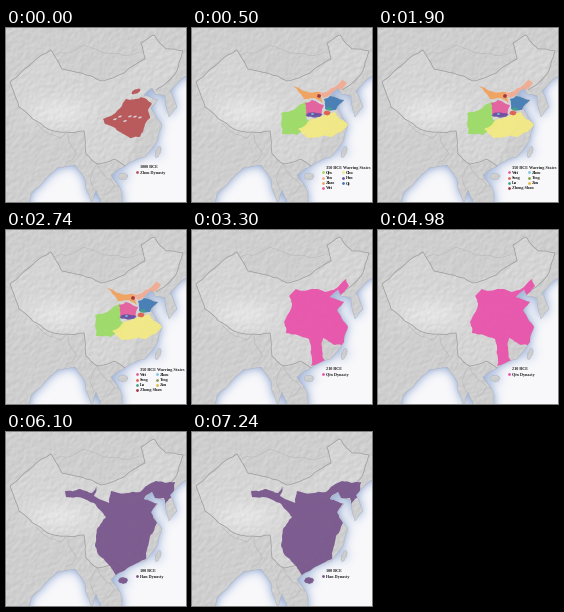
A matplotlib script that plays this animation: 180 px wide and 174 px high, repeating every 8 s.

```python
import numpy as np
import matplotlib.pyplot as plt
from matplotlib.animation import FuncAnimation
from matplotlib.patches import PathPatch
from matplotlib.path import Path

W, H, DPI = 180, 174, 100
INTERVAL, FRAMES = 100, 80
STARTS = [0, 500, 1900, 3300, 6100]

fig = plt.figure(figsize=(W / DPI, H / DPI), dpi=DPI)
ax = fig.add_axes([0, 0, 1, 1])
ax.set_xlim(0, W)
ax.set_ylim(H, 0)
ax.axis("off")


def rough(points, amount=0.1, closed=True, depth=3):
    """Join key points by a ragged line made by midpoint displacement."""
    pts = np.array(points, float)
    rng = np.random.default_rng(4)
    if closed:
        pts = np.vstack([pts, pts[:1]])
    for _ in range(depth):
        step = np.diff(pts, axis=0)
        normal = np.c_[-step[:, 1], step[:, 0]]
        mid = pts[:-1] + step / 2 + normal * rng.uniform(-amount, amount, (len(step), 1))
        out = np.empty((len(pts) * 2 - 1, 2))
        out[::2], out[1::2] = pts, mid
        pts = out
    return Path(pts, closed=closed)


def blob(x, y, rx, ry, tilt=0):
    """A ragged ellipse."""
    a = np.linspace(0, 2 * np.pi, 8, endpoint=False)
    u, v, t = rx * np.cos(a), ry * np.sin(a), np.radians(tilt)
    return rough(np.c_[x + u * np.cos(t) - v * np.sin(t),
                       y + u * np.sin(t) + v * np.cos(t)], depth=2)


def blur(a, sigma):
    r = int(3 * sigma) + 1
    k = np.exp(-np.arange(-r, r + 1) ** 2 / (2 * sigma ** 2))
    k /= k.sum()
    for axis in (0, 1):
        pad = [(r, r) if i == axis else (0, 0) for i in (0, 1)]
        a = np.apply_along_axis(np.convolve, axis, np.pad(a, pad, mode="edge"), k, "valid")
    return a


def mix(a, b, t):
    return np.array(a) + (np.array(b) - np.array(a)) * t[..., None]


# Coast from the north-east round to the south-west
COAST = [
    (240, 15), (178, 49), (164, 63), (171, 79), (163, 89), (159, 68), (149, 66),
    (146, 60), (138, 67), (152, 72), (145, 80), (156, 97), (152, 112), (139, 129),
    (119, 138), (105, 147), (116, 165), (115, 200), (100, 200), (90, 162),
    (86, 176), (79, 151), (69, 137), (51, 140), (25, 166), (20, 200)]
MAINLAND = rough([(-60, 200), (-60, -60), (240, -60)] + COAST, 0.06)
TAIWAN = blob(152, 124, 6, 2.5, 110)
HAINAN = blob(117, 148.5, 5, 3.5)
LAND = Path.make_compound_path(MAINLAND, TAIWAN, HAINAN)

BORDER = rough([
    (150, 62), (169, 46), (177, 23), (160, 21), (148, 7), (135, 15), (139, 31),
    (118, 45), (95, 53), (56, 41), (45, 22), (25, 36), (4, 54), (13, 79), (42, 101),
    (78, 103), (80, 126), (92, 136), (108, 131), (119, 138)], 0.06, closed=False)
NEIGHBOURS = [
    [(47, 27), (78, 17), (101, 25), (133, 24)],
    [(30, 95), (54, 110), (62, 104), (71, 126), (60, 135)],
    [(92, 136), (84, 151), (88, 162)],
    [(92, 136), (109, 157), (101, 167)],
]

# Relief and sea shading
yy, xx = np.mgrid[0.5:H, 0.5:W]
cells = np.c_[xx.ravel(), yy.ravel()]
on_land = np.any([p.contains_points(cells) for p in (MAINLAND, TAIWAN, HAINAN)], axis=0)
near = np.clip(blur(on_land.reshape(H, W).astype(float), 5) * 1.5, 0, 1)
sea = mix([.975, .975, .985], [.66, .73, .86], near)

rng = np.random.default_rng(12)
relief = blur(rng.normal(size=(H, W)), 1.2)
slope = np.gradient(relief, axis=0) + np.gradient(relief, axis=1)
slope = np.clip(slope / slope.std(), -2, 2)
plateau = np.exp(-((xx - 53) / 31) ** 2 - ((yy - 84) / 15) ** 2)
inside = BORDER.contains_points(cells).reshape(H, W)
gray = .81 + .025 * inside + .06 * plateau + .012 * slope
land = np.repeat(np.clip(gray, 0, 1)[..., None], 3, axis=2)

extent = (0, W, H, 0)
ax.imshow(sea, extent=extent, aspect="auto", interpolation="bilinear")
ground = ax.imshow(land, extent=extent, aspect="auto", interpolation="bilinear")
ground.set_clip_path(LAND, ax.transData)


def outline(path, color, width):
    ax.add_patch(PathPatch(path, fc="none", ec=color, lw=width, zorder=2))


outline(LAND, "#a9b0bc", .3)
outline(BORDER, "#999999", .5)
for points in NEIGHBOURS:
    outline(rough(points, closed=False), "#b4b4b4", .35)


def region(color, shape, alpha=.92):
    path = shape if isinstance(shape, Path) else rough(shape)
    patch = ax.add_patch(PathPatch(path, fc=color, ec="none", alpha=alpha, zorder=3))
    patch.set_clip_path(LAND, ax.transData)
    return patch


def label(x, y, text):
    return ax.text(x, y, text, family="Liberation Serif", weight="bold",
                   fontsize=4.3 * 72 / DPI, color="#222222",
                   va="center_baseline", zorder=6)


def legend(title, *columns):
    items = [label(134, 139, title)]
    for x, entries in zip((134, 154), columns):
        for row, (name, color) in enumerate(entries.items()):
            y = 144.3 + 5.2 * row
            items += ax.plot(x - 3.3, y, "o", ms=2, mew=0, color=color, zorder=6)
            items.append(label(x, y, name))
    return items


RED, PINK, PURPLE = "#b75052", "#e94fa9", "#76538b"
GREEN, YELLOW, ORANGE, PEACH = "#9bdc63", "#f4ea82", "#f3a05a", "#f3aa90"
BLUE, VIOLET, ROSE = "#3f79b5", "#6450a0", "#e45b9c"
MAROON, TEAL, SKY, SCARLET = "#9c3140", "#43a287", "#79c5e5", "#df5c4b"
OLIVE, GOLD = "#829c45", "#e5b63c"

zhou = [
    region(RED, [(97, 91), (113, 81), (120, 71), (135, 69), (146, 76), (142, 82),
                 (144, 90), (139, 96), (134, 109), (124, 110), (112, 103), (99, 96)]),
    region(RED, blob(130, 63.5, 5, 2.3, -25)),
]
for x in range(109, 137, 5):
    zhou.append(region("#d4d4d4", blob(x, rng.uniform(85, 98), 2, .9, -20), 1))

states = [
    region(GREEN, [(89, 85), (114, 73), (114, 88), (119, 95), (105, 107), (90, 106)]),
    region(YELLOW, [(106, 101), (119, 91), (143, 84), (157, 96), (140, 109), (115, 110)]),
    region(ORANGE, [(101, 58), (128, 64), (131, 75), (119, 70), (112, 71)]),
    region(PEACH, [(126, 65), (144, 58), (151, 51), (155, 55), (144, 65), (132, 70)]),
    region(BLUE, [(132, 71), (138, 68), (153, 72), (144, 82), (133, 81)]),
    region(ROSE, [(113, 75), (120, 72), (132, 77), (130, 87), (114, 86)]),
    region(VIOLET, blob(122, 87, 8.5, 2.7)),
    region(SCARLET, blob(135, 85, 3.5, 2.5)),
    region(TEAL, blob(137, 81, 3, 1.8)),
    region(MAROON, blob(127, 68, 2, 2)),
    region(SKY, blob(120.5, 86, 1.5, 1)),
]

qin = [region(PINK, [
    (100, 74), (97, 66), (104, 59), (122, 59), (133, 62), (145, 58), (154, 49),
    (157, 56), (147, 66), (146, 60), (138, 67), (154, 70), (146, 80), (158, 97),
    (153, 116), (143, 115), (131, 108), (130, 119), (133, 131), (119, 136),
    (117, 109), (94, 103), (92, 92)])]

han = [
    region(PURPLE, [
        (59, 59), (74, 57), (86, 61), (91, 53), (88, 64), (103, 71), (105, 59),
        (134, 60), (150, 49), (169, 50), (168, 63), (159, 73), (158, 66), (147, 67),
        (146, 60), (138, 67), (154, 70), (146, 80), (151, 91), (144, 104), (140, 127),
        (124, 138), (110, 144), (104, 134), (89, 114), (91, 97), (100, 85),
        (88, 71), (60, 65)]),
    region(PURPLE, HAINAN),
]

TITLE = "350 BCE Warring States"
scenes = [
    zhou + legend("1000 BCE", {"Zhou Dynasty": RED}),
    states + legend(TITLE, {"Qin": GREEN, "Yan": PEACH, "Zhao": ORANGE, "Wei": ROSE},
                    {"Chu": YELLOW, "Han": VIOLET, "Qi": BLUE}),
    states + legend(TITLE, {"Wei": ROSE, "Song": SCARLET, "Lu": TEAL, "Zhong Shan": MAROON},
                    {"Zhou": SKY, "Teng": OLIVE, "Zou": GOLD}),
    qin + legend("210 BCE", {"Qin Dynasty": PINK}),
    han + legend("100 BCE", {"Han Dynasty": PURPLE}),
]
everything = [artist for scene in scenes for artist in scene]


def update(frame):
    current = np.searchsorted(STARTS, frame * INTERVAL, side="right") - 1
    for artist in everything:
        artist.set_visible(False)
    for artist in scenes[current]:
        artist.set_visible(True)
    return everything


anim = FuncAnimation(fig, update, frames=FRAMES, interval=INTERVAL,
                     repeat=True, repeat_delay=0, blit=False)
plt.show()
```
